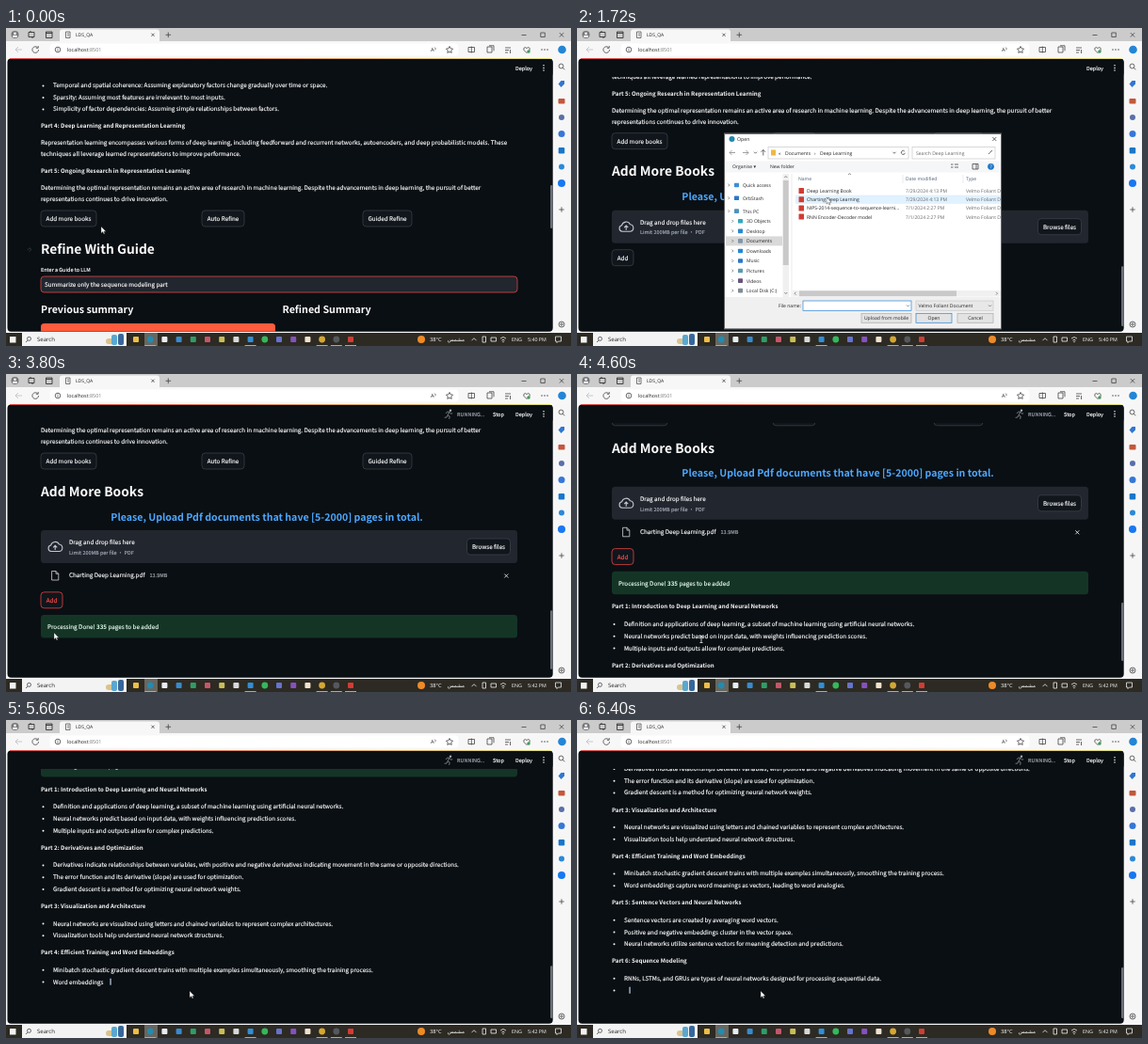
Recreate the animation shown at these times as an HTML page. Size 600 px wide and 338 px high, loop 6440 ms.

```html
<!DOCTYPE html>
<html lang="en">
<head>
<meta charset="utf-8">
<title>Upload and summarize</title>
<style>
html, body { margin: 0; width: 100%; height: 100%; overflow: hidden; background: #0a0f13; }
svg { display: block; width: 100vw; height: 100vh; text-rendering: geometricPrecision; }
text { white-space: pre; }
.web { font-family: "Noto Sans CJK SC", "Noto Sans CJK JP", "Noto Sans CJK", Lato, sans-serif; fill: #fafafa; }
.web text { stroke: currentColor; stroke-width: .16; color: #fafafa; }
.web .b { font-weight: 700; stroke: none; }
.web .dim { fill: #a3a8b4; color: #a3a8b4; }
.ui { font-family: "Open Sans", "Noto Sans", sans-serif; fill: #222; }
.line { fill: none; stroke: #444; stroke-width: .8; }
.tray .line { stroke: #eee; }
.btn rect { fill: #10161c; stroke: #41444c; stroke-width: .7; }
.btn.hot rect { stroke: #ff4b4b; }
.btn.hot text { fill: #ff4b4b; color: #ff4b4b; }
</style>
</head>
<body>
<svg id="stage" viewBox="0 0 600 338" preserveAspectRatio="none"></svg>
<script>
const LOOP = 6440, BODY = 6.29, SMALL = 5.5, PAGE = '#0a0f13';

// Markup helpers; y is the visual middle of the text.
const text = (x, y, s, size = BODY, more = '') =>
  `<text x="${x}" y="${(y + size * .39).toFixed(2)}" font-size="${size}" ${more}>${s}</text>`;
const rect = (x, y, w, h, fill, rx = 0, more = '') =>
  `<rect x="${x}" y="${y}" width="${w}" height="${h}" fill="${fill}" rx="${rx}" ${more}/>`;
const dot = (x, y, r, fill) => `<circle cx="${x}" cy="${y}" r="${r}" fill="${fill}"/>`;
const line = (d, more = '') => `<path class="line" d="${d}" ${more}/>`;
const group = (id, body, more = '') => `<g id="${id}" ${more}>${body}</g>`;
const bold = (x, y, s, size = 6.13) => text(x, y, s, size, 'class="b"');
const button = (id, x, y, w, label) =>
  group(id, rect(x, y - 8.5, w, 17, '#10161c', 3.5) + text(x + w / 2, y, label, BODY, 'text-anchor="middle"'), 'class="btn"');
const bullet = (y, s) => dot(39.5, y + .4, 1, '#fafafa') + text(50, y, s);
const cross = (x, y, r, more = '') => line(`M${x - r} ${y - r}l${2 * r} ${2 * r}m0 ${-2 * r}l${-2 * r} ${2 * r}`, more);

const summary = [
  '#Part 1: Introduction to Deep Learning and Neural Networks',
  'Definition and applications of deep learning, a subset of machine learning using artificial neural networks.',
  'Neural networks predict based on input data, with weights influencing prediction scores.',
  'Multiple inputs and outputs allow for complex predictions.',
  '#Part 2: Derivatives and Optimization',
  'Derivatives indicate relationships between variables, with positive and negative derivatives indicating movement in the same or opposite directions.',
  'The error function and its derivative (slope) are used for optimization.',
  'Gradient descent is a method for optimizing neural network weights.',
  '#Part 3: Visualization and Architecture',
  'Neural networks are visualized using letters and chained variables to represent complex architectures.',
  'Visualization tools help understand neural network structures.',
  '#Part 4: Efficient Training and Word Embeddings',
  'Minibatch stochastic gradient descent trains with multiple examples simultaneously, smoothing the training process.',
  'Word embeddings capture word meanings as vectors, leading to word analogies.',
  '#Part 5: Sentence Vectors and Neural Networks',
  'Sentence vectors are created by averaging word vectors.',
  'Positive and negative embeddings cluster in the vector space.',
  'Neural networks utilize sentence vectors for meaning detection and predictions.',
  '#Part 6: Sequence Modeling',
  'RNNs, LSTMs, and GRUs are types of neural networks designed for processing sequential data.',
  ''
];

// Lay the summary out below the button row and number its words.
let y = 201.3, wordCount = 0;
const items = summary.map((raw, i) => {
  const head = raw[0] === '#';
  if (i) y += head ? 18.1 : summary[i - 1][0] === '#' ? 18.5 : 12.75;
  const words = raw.replace('#', '').split(' ').filter(Boolean);
  const item = { head, words, y, start: wordCount };
  wordCount += words.length;
  return item;
});
const wordMark = items[13].start + 2;

function browser() {
  const toolbarIcons = text(451, 23, 'A<tspan font-size="3.5" dy="-2">))</tspan>', 5.5) +
    line('M471 19.5l1.1 2.3 2.5.3-1.8 1.8.4 2.5-2.2-1.2-2.2 1.2.4-2.5-1.8-1.8 2.5-.3z') +
    line('M491 20.5h6.5v5h-6.5zM494.3 19.5v7M511 20h5v6h-5zM513 18.8h5v5.5M530 21h6M530 23.5h4M530 26h3M535.5 23v4') +
    line('M553 26.5l-3-3q-1-2.5 1.3-3l1.700 1 1.700-1q2.300.5 1.300 3z') + dot(555, 25, 1.7, '#3f9a55') +
    [569, 572, 575].map(cx => dot(cx, 23, .7, '#333')).join('');
  const side = dot(590, 95, 3, '#5a6fa8') + dot(590, 112.5, 3.5, '#3577d8') + rect(586.7, 127, 6.5, 6.5, '#1976c8', 1.3) +
    dot(590, 147.5, 3, '#2b89d8') + dot(590, 165, 4, '#1877f2') +
    '<path d="M586.5 59.500l3-3.500h3.500v3.500l-3.500 3.500z" fill="#2f77d0"/>' + rect(586.5, 75, 7, 5.5, '#c4573a', 1);
  return rect(0, 0, 600, 338, '#f6f6f7') + rect(0, 0, 600, 15, '#cbcbcb') +
    rect(57, 1.5, 106, 15, '#f7f7f7', 3) + rect(0, 14, 600, 18.5, '#f7f7f7') +
    dot(9.5, 7, 4, '#77777c') + dot(9.5, 5.8, 1.4, '#eee') + rect(7, 7.7, 5, 2.2, '#eee', 1) +
    line('M24 4.5h6v5h-6zM26 3v1.5M28 9.5v1.5M42.5 4h6.5v6.5h-6.5zM42.5 5.500h6.5', 'style="stroke:#222"') +
    line('M63.5 4h4.5v6.5h-4.5zM65 6h2M65 8h2', 'style="stroke:#555"') +
    text(74, 7, 'LDS_QA', 5) + cross(156, 7.3, 1.6) + line('M169.5 7.3h5.6M172.3 4.5v5.6') +
    line('M547.5 7.5h5M567.8 5h4.5v4.5h-4.5z') + cross(590, 7.3, 2.2) +
    line('M10 23h7M13 20l-3 3 3 3', 'style="stroke:#bbb"') +
    line('M33.5 20.7a3.3 3.3 0 1 0 1 2.3M34.2 19v2.3h-2.3') +
    rect(46.5, 16.5, 434, 13, '#fff', 4) +
    '<circle class="line" cx="55" cy="23" r="2.8"/>' + line('M55 22.5v2M55 21v.6') +
    text(65, 23, 'localhost<tspan fill="#777">:8501</tspan>', 5.4) + toolbarIcons +
    dot(590.5, 23, 4.3, '#2385d5') + '<circle class="line" cx="589.5" cy="40.5" r="2.4"/>' + line('M591.3 42.3l2 2') + side +
    line('M587.3 193h5.4M590 190.3v5.4') +
    '<circle class="line" cx="590" cy="315" r="3"/><circle class="line" cx="590" cy="315" r="1.2"/>';
}

function taskbar() {
  const apps = ['#edbd45', '#238bb0', '#e8edf2', '#368bd0', '#2f9d68', '#c5566a', '#c9bd58', '#d8dad8', '#2f8fd8',
    '#34b85b', '#6672d0', '#8650c0', '#f0e2cf', '#d5a632', '#55585e', '#d33b32'];
  const round = [1, 9, 13, 14], running = [1, 8, 13, 14, 15];
  const at = i => +(138 + i * 15.2).toFixed(1);
  const icons = apps.map((fill, i) => round.includes(i) ? dot(at(i), 331, 3.4, fill) : rect(at(i) - 3, 328, 6, 6, fill, 1)).join('');
  const white = 'fill="#fff"';
  return rect(0, 324, 600, 14, '#2c2a23') + rect(4, 328, 6.5, 6.5, '#f2f2f2') + rect(17, 324, 111, 14, '#f3f3f3') +
    '<circle cx="24.5" cy="330.300" r="2" fill="none" stroke="#444" stroke-width=".8"/>' + line('M23 332l-2 2', 'style="stroke:#444"') +
    text(33, 331, 'Search', 6) +
    rect(106, 330, 9, 6, '#d9c38e', 3) + rect(112, 326, 6, 11, '#5aa7cf', 2) + rect(119, 325, 6, 12, '#37679a', 2) +
    rect(147, 324, 14, 14, '#68665f') + icons + running.map(i => rect(at(i) - 6, 337, 12, 1, '#76b9ed')).join('') +
    dot(441, 331, 4, '#ee8a28') + text(450, 331, '38°C', 5.7, white) +
    text(487, 331, 'مشمس', 5.6, white + ' text-anchor="end" style="font-family:\'DejaVu Sans\',sans-serif"') +
    '<g class="tray">' + line('M494.5 332.2l2.5-2.5 2.5 2.5M506 328h3.500v6h-3.500zM515 329h5.5v4h-5.5zM525 330q3-3 6 0M526.4 332q1.6-1.5 3.2 0') +
    line('M583.5 328h6v5h-3l-1.5 1.5v-1.5h-1.5z') + '</g>' +
    dot(528, 333.5, .7, '#eee') + text(537, 331, 'ENG', 5.3, white) + group('clock', text(554, 331, '', 5.3, white));
}

function earlierText() {
  return bullet(-141, 'Temporal and spatial coherence: Assuming explanatory factors change gradually over time or space.') +
    bullet(-128.5, 'Sparsity: Assuming most features are irrelevant to most inputs.') +
    bullet(-116, 'Simplicity of factor dependencies: Assuming simple relationships between factors.') +
    bold(37, -98, 'Part 4: Deep Learning and Representation Learning') +
    text(37, -80, 'Representation learning encompasses various forms of deep learning, including feedforward and recurrent networks, autoencoders, and deep probabilistic models. These') +
    text(37, -68.6, 'techniques all leverage learned representations to improve performance.') +
    bold(37, -50, 'Part 5: Ongoing Research in Representation Learning') +
    text(37, -32, 'Determining the optimal representation remains an active area of research in machine learning. Despite the advancements in deep learning, the pursuit of better') +
    text(37, -20.6, 'representations continues to drive innovation.') +
    button('more', 37, .5, 59, 'Add more books') + button('auto', 208, .5, 45, 'Auto Refine') + button('guided', 379, .5, 52, 'Guided Refine');
}

function refinePanel() {
  return line('M22.7 34l1.6-1.6a1 1 0 0 1 1.8 1.8l-1.6 1.6', 'style="stroke:#3c414c"') +
    bold(37, 33, 'Refine With Guide', 13.8) + text(37, 55, 'Enter a Guide to LLM', SMALL) +
    rect(37, 62, 506, 17, '#22262e', 3.5, 'stroke="#ff4b4b" stroke-width=".7"') +
    text(41, 70.5, 'Summarize only the sequence modeling part') +
    bold(37, 97, 'Previous summary', 10.7) + bold(293.5, 97, 'Refined Summary', 10.7) + rect(37, 112, 249, 60, '#ff5b3d', 3.5);
}

function uploadPanel() {
  return bold(37, 32.4, 'Add More Books', 13.8) +
    text(277, 59.5, 'Please, Upload Pdf documents that have [5-2000] pages in total.', 10.6, 'class="b" text-anchor="middle" fill="#4da8ff"') +
    rect(37, 74, 506, 35, '#22262e', 3.5) +
    line('M48 96.5a3.3 3.3 0 0 1-.4-6.5a4.7 4.7 0 0 1 8.8-1a3.8 3.8 0 0 1 .4 7.5zM52.2 95v-4.5M50.2 92.3l2-2 2 2', 'style="stroke:#c5c8d0;stroke-width:1.1"') +
    text(67, 87, 'Drag and drop files here') + text(67, 97.6, 'Limit 200MB per file • PDF', SMALL, 'class="dim"') +
    button('browse', 489.5, 91.5, 46, 'Browse files') +
    group('file', line('M48.6 117.5h4.4l2.8 2.8v6.7h-7.2zM53 117.5v2.8h2.8', 'style="stroke:#d5d7de"') +
      text(67, 122, 'Charting Deep Learning.pdf') + text(152.5, 122.3, '13.9MB', SMALL, 'class="dim"') + cross(531.3, 122.5, 2, 'style="stroke:#fafafa"')) +
    button('add', 37, 0, 23, 'Add') +
    group('done', rect(37, 164, 506, 24.5, '#143526', 3.5) +
      text(44, 176.5, 'Processing Done! <tspan class="b">335</tspan> pages to be added', BODY, 'fill="#dffde9"')) +
    group('stream', items.map(it => `<g>${it.head ? bold(37, it.y, '') : bullet(it.y, '')}</g>`).join('') +
      rect(0, 0, 1.1, 7, '#cfe4ff', 0, 'id="caret"'));
}

function appHeader() {
  const pale = 'style="stroke:#8d929c"';
  return rect(2, 32.5, 578.5, 19.5, PAGE, 4) + rect(4, 32, 575, 1, 'url(#glow)', 0, 'opacity=".8"') + text(541, 42.5, 'Deploy', SMALL) +
    [39.8, 42.4, 45].map(cy => dot(571, cy, .75, '#fafafa')).join('') +
    group('busy', text(479, 42.5, 'RUNNING...', SMALL, 'class="dim"') + text(517, 42.5, 'Stop', SMALL) + dot(472, 38.7, 1.2, '#a3a8b4') +
      group('bike', line('M469.4 45a2 2 0 1 0-4 0a2 2 0 1 0 4 0M475.6 45a2 2 0 1 0-4 0a2 2 0 1 0 4 0M467.4 45l2.5-4 2.5 1.8h2M469.5 41l1.5 4', pale)) +
      group('runner', line('M470.8 40.2l-1.8 3.5 2.2 1.4-.6 2.8M469 43.7l-1 2.3-2.4.3M467 42l1.5-1.8h2.3l1.6 2 1.8-.4', pale)));
}

function dialog() {
  const label = (x, ly, s, more) => text(x, ly, s, 5.05, more);
  const thin = 'style="stroke-width:.6"', grey = 'fill="#666"', blue = 'fill="#4c607a"';
  const places = ['Quick access', 'OrbStash', 'This PC', '3D Objects', 'Desktop', 'Documents', 'Downloads', 'Music', 'Pictures', 'Videos', 'Local Disk (C:)'];
  const tints = ['#3c8fd8', '#2779c8', '#4d92bd', '#35a7bd', '#2a88ce', '#8296a8', '#2887d4', '#2a77cb', '#5c9ab0', '#65547f', '#7f8b94'];
  const tree = places.map((name, i) => {
    const py = i < 3 ? 167 + i * 13.8 : 205.3 + (i - 3) * 10.55, px = i < 3 ? 169 : 173;
    return (i === 5 ? rect(158, py - 5, 60, 10, '#d9d9d9') : '') + rect(px - 2, py - 2.3, 5, 4.6, tints[i], .7) +
      line(`M${px - 8.5} ${py - 1.4}l1.4 1.4-1.4 1.4`, thin) + label(px + 7, py, name);
  }).join('');
  const rows = [['Deep Learning Book', '7/29/2024 4:13 PM'], ['Charting Deep Learning', '7/29/2024 4:13 PM'],
    ['NIPS-2014-sequence-to-sequence-learni...', '7/1/2024 2:27 PM'], ['RNN Encoder-Decoder model', '7/1/2024 2:27 PM']];
  const files = rows.map(([name, date], i) => {
    const ry = 173 + i * 9.2;
    return rect(235.5, ry - 3, 5.5, 6, '#cf3d33', .5) + label(244, ry, name) +
      label(349, ry, date, grey) + label(413, ry, 'Velmo Foliant Document', grey);
  }).join('');
  const box = (x, by, w, h, edge = '#c8c8c8', fill = '#fff') => rect(x, by, w, h, fill, 0, `stroke="${edge}" stroke-width=".7"`);
  const push = (x, w, s, edge) => box(x, 303.3, w, 10, edge, '#e3e3e3') + label(x + w / 2, 308.3, s, 'text-anchor="middle"');
  return rect(157, 112.5, 293, 207, '#fff') + dot(164.5, 118, 3, '#2387b3') + text(170, 118, 'Open', 5.2) + cross(443.3, 118, 2) +
    line('M168 132.5h-6M164.5 130l-2.5 2.5 2.5 2.5M176 132.5h6M179.5 130l2.5 2.5-2.5 2.5', 'style="stroke:#888"') +
    line('M188 131.7l1.5 1.5 1.5-1.5M197.8 135.5v-6M195.5 131.8l2.3-2.3 2.3 2.3') +
    box(203, 126.5, 149, 12.5) + rect(206, 129.5, 5, 6, '#edb944') + label(214, 132.7, '«') + label(221, 132.7, 'Documents') +
    label(252, 132.7, '›') + label(258, 132.7, 'Deep Learning') +
    line('M335.5 131.8l1.5 1.5 1.5-1.5M347.8 131a2 2 0 1 0 .5 1.8') +
    box(356, 126.5, 88, 12.5) + label(360, 132.7, 'Search Deep Learning', grey) + line('M438.5 132.5l2.5-2.5M437 134l1.5-1.5') +
    rect(157, 141.5, 293, 12, '#f5f6f7') + label(165, 147.3, 'Organise ▾') + label(205, 147.3, 'New folder') +
    line('M397 145h2.5M397 148h2.5M401 145h4M401 148h4M420 144.5h6v5.5h-6zM424 144.5v5.5') + dot(439.5, 147.3, 3.4, '#2378c8') +
    label(439.5, 147.3, '?', 'fill="#fff" text-anchor="middle"') + tree +
    rect(218.5, 155, 6.5, 131, '#f0f0f0') + rect(218.8, 162, 5.9, 90, '#c9c9c9') +
    line('M220.3 159l1.5-1.5 1.5 1.5M220.3 281l1.5 1.5 1.5-1.5M288 156l1.5-1.3 1.5 1.3', thin) +
    line('M228 155v131M346 156v9M410 156v9', 'style="stroke:#ddd;stroke-width:.6"') +
    label(235, 160, 'Name', blue) + label(349, 160, 'Date modified', blue) + label(413, 160, 'Type', blue) +
    rect(232, 177.6, 218, 9.2, '#e0f1ff', 0, 'id="row"') + files +
    rect(229, 279, 221, 6.5, '#f0f0f0') + rect(236, 279.3, 167, 5.9, '#c9c9c9') +
    line('M232.5 280.7l-1.5 1.5 1.5 1.5M445 280.7l1.5 1.5-1.5 1.5', thin) +
    rect(157, 286, 293, 33.5, '#f0f0f0') + label(238, 295.3, 'File name:', 'text-anchor="end"') +
    box(240, 290, 115, 10.3, '#2583d8') + group('picked', label(242.5, 295.3, 'Charting Deep Learning')) +
    box(360, 290, 82, 10.3, '#c8c8c8', '#e8e8e8') + label(362.5, 295.3, 'Velmo Foliant Document') +
    line('M350 294.5l1.5 1.5 1.5-1.5M437 294.5l1.5 1.5 1.5-1.5', thin) +
    push(302, 53, 'Upload from mobile', '#adadad') + push(360, 38, 'Open', '#2583d8') + push(404, 38, 'Cancel', '#adadad');
}

const pointers =
  group('arrow', '<path d="M0 0V7.2L1.7 5.6 2.9 8 4 7.500 2.900 5.200H5.200Z" fill="#fff" stroke="#222" stroke-width=".4"/>') +
  group('hand', '<path d="M-.8 1a.8.8 0 0 1 1.6 0v3l3.2.8q1 .3.9 1.5l-.7 3.2h-4.5l-2.7-3.5q-.3-1.2.9-1l1.3 1z" fill="#fff" stroke="#222" stroke-width=".4"/>') +
  group('beam', '<path d="M-1.5-3.5h3M0-3.5v7M-1.5 3.5h3" fill="none" stroke="#eee" stroke-width=".8"/>');

const stage = document.getElementById('stage');
stage.innerHTML = `<defs>
  <linearGradient id="glow"><stop stop-color="#ff4b4b"/><stop offset="1" stop-color="#fffd80"/></linearGradient>
  <clipPath id="view"><rect x="2" y="52" width="578" height="270.5"/></clipPath>
  <clipPath id="frame"><rect x="157" y="112.5" width="293" height="207"/></clipPath></defs>` +
  `<g class="ui">${browser()}</g>` + rect(1.5, 32.5, 579.2, 290.3, PAGE, 4) +
  `<g class="web"><g clip-path="url(#view)">` +
  group('page', earlierText() + group('refine', refinePanel()) + group('upload', uploadPanel())) + '</g>' +
  appHeader() + '</g>' + rect(578, 0, 2.6, 10, '#6b6f78', 1.2, 'id="thumb"') +
  `<g class="ui">${taskbar()}` +
  group('dialog', rect(156.5, 112, 294, 208, 'none', 0, 'stroke="#777" stroke-width=".8"') + `<g clip-path="url(#frame)">${dialog()}</g>`) + '</g>' +
  group('cursor', pointers);

const $ = id => document.getElementById(id);
const show = (id, on) => $(id).setAttribute('display', on ? 'inline' : 'none');
const streamNodes = [...$('stream').querySelectorAll('g')];
const clock = $('clock').firstChild;

// Eased value from rows of [time, ...values].
function track(rows, t) {
  const i = rows.findIndex(r => r[0] > t);
  if (i < 0) return rows[rows.length - 1].slice(1);
  const a = rows[i - 1], b = rows[i], u = (t - a[0]) / (b[0] - a[0]), e = u * u * (3 - 2 * u);
  return a.slice(1).map((v, k) => v + (b[k + 1] - v) * e);
}

const mouse = [[0, 101, 211], [150, 101, 211], [500, 82, 206], [900, 82, 206], [1200, 511, 211], [1380, 511, 211], [1640, 265, 180],
  [1850, 265, 180], [2030, 378, 307], [2160, 378, 307], [2500, 48, 243], [2680, 48, 243], [2860, 51, 275], [3800, 51, 275],
  [4300, 132, 282], [4650, 132, 282], [5000, 195, 288]];
const scroll = [[0, 202], [699, 202], [700, 151.7], [980, 151.7], [1180, 119.7], [2249, 119.7], [2250, 95.8], [3700, 95.8], [4300, 45.8]];
const bar = [[0, 167, 46], [699, 167, 46], [700, 245, 70], [980, 245, 70], [1180, 253, 64], [3550, 254, 63], [4300, 243, 62],
  [4680, 243, 62], [5000, 260, 57], [6400, 263, 54]];

function typeSummary(t) {
  const shown = Math.floor(wordMark + (t - 5600) / 800 * (wordCount - wordMark) + .001);
  let last = null;
  items.forEach((it, i) => {
    const on = shown >= it.start, node = streamNodes[i];
    node.setAttribute('display', on ? 'inline' : 'none');
    if (!on) return;
    const label = node.querySelector('text');
    label.textContent = it.words.slice(0, shown - it.start).join(' ');
    last = { it, label };
  });
  show('caret', last);
  if (!last) return 0;
  const left = last.it.head ? 37 : 50, width = last.label.textContent ? last.label.getComputedTextLength() : 0;
  $('caret').setAttribute('x', left + width + (width ? 7 : 5.5));
  $('caret').setAttribute('y', last.it.y - 3.5);
  return last.it.y - (width ? 0 : 9);
}

function draw(t) {
  const hasFile = t >= 2250, busy = t >= 2700, answered = t >= 3560;
  show('refine', t < 700);
  show('upload', t >= 700);
  show('file', hasFile);
  show('done', answered);
  show('stream', answered);
  show('busy', busy);
  show('bike', t < 3560);
  show('runner', answered);
  show('dialog', t >= 1380 && t < 2160);
  show('row', t >= 1600);
  show('picked', t >= 1800);
  $('row').setAttribute('fill', t < 1800 ? '#e0f1ff' : '#cce8ff');
  $('more').classList.toggle('hot', t >= 450 && t < 1250);
  $('add').classList.toggle('hot', t >= 2480);
  $('add').setAttribute('transform', `translate(0 ${hasFile ? 148.3 : 124.5})`);
  clock.textContent = answered ? '5:42 PM' : '5:40 PM';

  let [top] = track(scroll, t);
  if (answered) {
    const tail = typeSummary(t), [follow] = track([[0, 0], [4680, 0], [5000, 1]], t);
    top += (278.2 - tail - top) * follow;
  }
  $('page').setAttribute('transform', `translate(0 ${top.toFixed(2)})`);

  const [thumbY, thumbH] = track(bar, t);
  $('thumb').setAttribute('y', thumbY);
  $('thumb').setAttribute('height', thumbH);

  const [mx, my] = track(mouse, t);
  const hand = (t >= 400 && t < 960) || (t >= 1160 && t < 1380) || (t >= 2460 && t < 2720);
  const beam = t >= 4200 && t < 4720;
  $('cursor').setAttribute('transform', `translate(${mx} ${my})`);
  show('hand', hand);
  show('beam', beam);
  show('arrow', !hand && !beam);
}

const began = performance.now();
function tick() {
  draw((performance.now() - began) % LOOP);
  requestAnimationFrame(tick);
}
tick();
</script>
</body>
</html>
```
